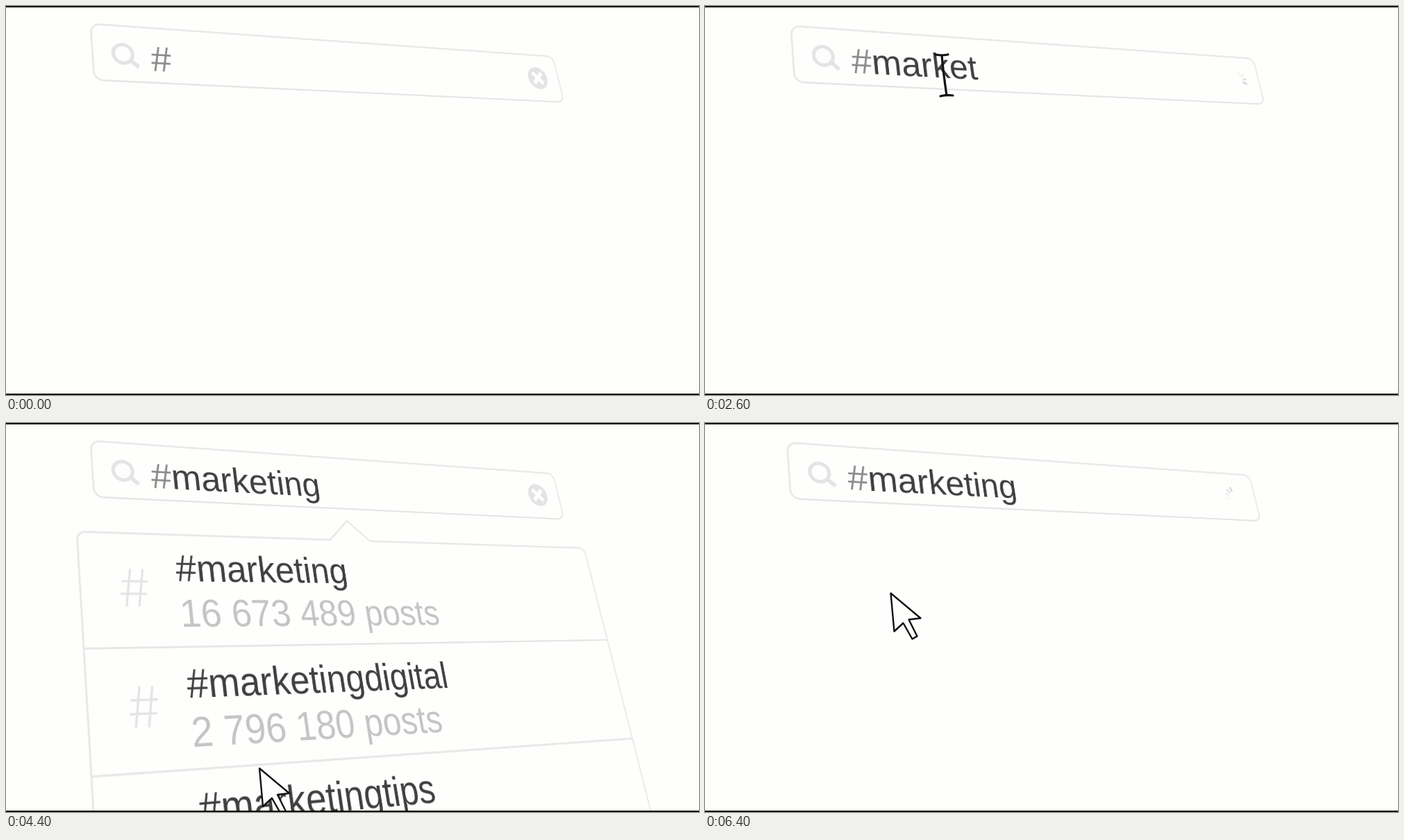
These frames come from a looping animation (998 px wide and 561 px high, 7000 ms). An HTML page:

```html
<!DOCTYPE html>
<html lang="en">
<head>
<meta charset="utf-8">
<title>Hashtag search</title>
<style>
  html, body { margin: 0; width: 100%; height: 100%; overflow: hidden; background: #fefefd; }
  #stage { position: relative; width: 998px; height: 561px; overflow: hidden; background: #fefefd; }
  #stage::before, #stage::after { content: ""; position: absolute; left: 0; width: 100%; background: #000; z-index: 1; }
  #stage::before { top: 0; height: 1.5px; }
  #stage::after { bottom: 0; height: 2px; }
  #camera { position: absolute; inset: 0; }
  svg { position: absolute; left: 0; overflow: visible; }
  #plane {
    top: -200px; transform-origin: 0 200px;
    transform: matrix3d(.955, .07245, 0, .00026967, .028595, .85229, 0, -.0002378, 0, 0, 1, 0, 102, 156.6, 0, 1);
  }
  #cursor { top: 0; }
  text { font: 62.4px "Liberation Sans", Arial, sans-serif; fill: #404040; white-space: pre; text-rendering: geometricPrecision; }
  .sub { fill: #c4c4c4; }
  .hash { fill: #8a8a8a; }
  .line { fill: none; stroke: #e6e6e6; stroke-width: 2.8; }
  .icon { fill: none; stroke: #e4e4e6; }
</style>
</head>
<body>
<div id="stage">
  <div id="camera">
    <svg id="plane" width="1000" height="800" viewBox="0 -200 1000 800">
      <rect class="line" x="31" y="-155" width="937" height="96.5" rx="15"/>
      <g class="icon" stroke-width="6">
        <circle cx="81" cy="-106" r="16"/>
        <path d="M92-96L106-84" stroke-width="7"/>
      </g>
      <text x="127.5" y="-79.5"><tspan class="hash">#</tspan><tspan id="typed"></tspan></text>
      <g transform="translate(917 -106.4)">
        <g id="clear">
          <circle r="23" fill="#e4e4e6"/>
          <path d="M-11-11L11 11M11-11L-11 11" stroke="#fefefd" stroke-width="8"/>
        </g>
        <g id="spinner" stroke="#d6d6d8" stroke-width="4.5"></g>
      </g>
      <g id="panel">
        <path class="line" d="M0 560V15Q0 0 15 0H440L479-36L519 0H985Q1000 0 1000 15V560M0 181.5H1000M0 363H1000"/>
      </g>
    </svg>
    <svg id="cursor" width="998" height="561" fill="none" stroke="#111" stroke-width="2.4" stroke-linejoin="round">
      <path id="beam" d="M-12-30Q-3-28 6-30M-3-29Q-1-5 4 29M-5 30Q4 28 13 29" stroke-width="3.2" stroke-linecap="round"/>
      <path id="arrow" d="M0 0L5 55L18 43L31 66L38 62L26 38L43 36Z" fill="#fefefd"/>
    </svg>
  </div>
</div>
<script>
const $ = id => document.getElementById(id);
const LOOP = 7000, STEP = 200, WORD = "marketing";

const rows = [["#marketing", "16 673 489 posts"], ["#marketingdigital", "2 796 180 posts"], ["#marketingtips", ""]];
$("panel").innerHTML += rows.map(([tag, posts], i) => `<g transform="translate(0 ${i * 181.5})">
  <path class="icon" stroke-width="3.6" d="M80 58L70 118M100 58L90 118M65 78H107M62 98H104"/>
  <text x="154.5" y="77.3">${tag}</text><text class="sub" x="154.5" y="149.5">${posts}</text></g>`).join("");

$("spinner").innerHTML = [1, .65, .35, .15].map((o, i) =>
  `<path d="M0-11V-21" opacity="${o}" transform="rotate(${-30 * i})"/>`).join("");

// Keys are [time, x, y]
const sway = [[800, 0, 0], [1200, -2, -1], [1800, .3, 3.8], [2000, 1.5, 4], [2600, 2, 3], [3400, 2, -1.7],
  [4400, 0, 0], [5200, 1, -2], [5800, -3, -2], [6400, -3.5, 2.5]];
const pointer = [[1000, 271, 243], [1600, 342, 97], [3400, 342, 97], [4400, 365, 498], [4500, 365, 498], [5200, 271, 243]];

const clamp = v => Math.min(1, Math.max(0, v));
function at(keys, t) {
  let i = 0;
  while (i < keys.length - 2 && t >= keys[i + 1][0]) i++;
  const [t0, x0, y0] = keys[i], [t1, x1, y1] = keys[i + 1];
  const p = clamp((t - t0) / (t1 - t0)), e = p * p * (3 - 2 * p);
  return [x0 + (x1 - x0) * e, y0 + (y1 - y0) * e];
}
const show = (id, on) => $(id).style.display = on ? "" : "none";

function draw(t) {
  const [cx, cy] = at(sway, t), [px, py] = at(pointer, t);
  $("camera").style.transform = `translate(${cx}px, ${cy}px)`;

  $("typed").textContent = WORD.slice(0, Math.max(0, (t - 2000) / 100));
  const busy = (t >= 2200 && t < 3200) || t >= 5600;
  show("spinner", busy);
  show("clear", !busy);
  $("spinner").setAttribute("transform", `rotate(${110 + .346 * (t - 2600)})`);

  $("panel").style.opacity = t < 5400 ? clamp((t - 3240) / 550) : clamp((5600 - t) / 500);

  const inBar = py < 140;
  show("beam", t >= 1000 && inBar);
  show("arrow", t >= 1000 && !inBar);
  for (const id of ["beam", "arrow"]) $(id).setAttribute("transform", `translate(${px} ${py})`);
}

const start = performance.now();
function tick() {
  const t = (performance.now() - start) % LOOP;
  draw(Math.floor(t / STEP) * STEP);
  requestAnimationFrame(tick);
}
tick();
</script>
</body>
</html>
```
